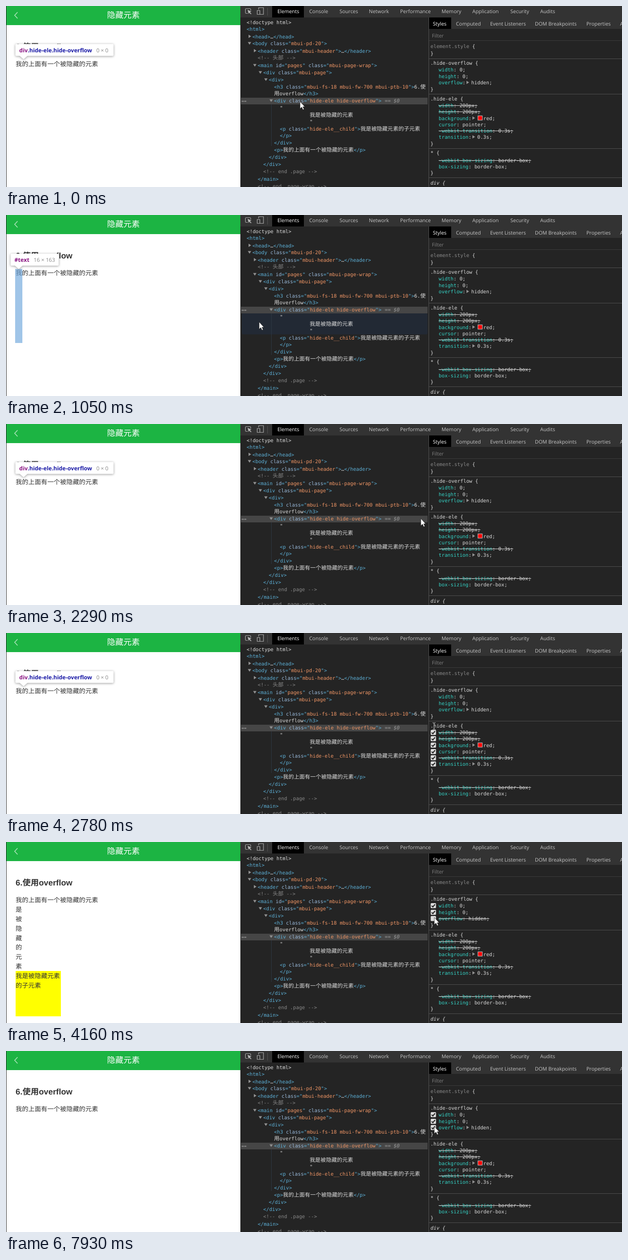
Recreate the animation shown at these times as an HTML page with a canvas. Size 1280 by 379 pixels, loop 8000 ms.

```html
<!DOCTYPE html>
<html lang="zh">
<head>
<meta charset="utf-8">
<style>
html, body { margin: 0; width: 100%; height: 100%; overflow: hidden; background: #242424; }
canvas { display: block; }
</style>
</head>
<body>
<canvas id="stage" width="1280" height="379"></canvas>
<script>
const ctx = document.getElementById('stage').getContext('2d');
ctx.textRendering = 'geometricPrecision';

const LOOP = 8000;
const CJK = '"Noto Sans CJK SC", "Noto Sans CJK JP", sans-serif';
const UI = `10.5px "Open Sans", ${CJK}`;
const MONO = '10.3px "DejaVu Sans Mono", monospace';
const TAG = '#5db0d7', ATTR = '#9bbbdc', VALUE = '#f29766', PLAIN = '#dcdcdc', DIM = '#898989', PROP = '#35d4c7';

// Pointer stops: start time, x, y, highlighted node, pointer shape
const STOPS = [
  [0, 611, 200, 'div'], [650, 565, 200, 'div'], [780, 525, 201, 'div'],
  [930, 525, 211, 'text'], [1050, 526, 224, 'text'], [1200, 545, 221, 'text'],
  [1330, 563, 217, 'text'], [1480, 604, 210, 'text'], [1600, 645, 203, 'div'],
  [1720, 673, 201, 'div'], [1870, 716, 200, 'div'], [2020, 775, 200, 'div'],
  [2140, 833, 200, 'div'], [2290, 862, 198, 'div'], [2410, 888, 194, '', 'beam'],
  [2530, 889, 195, '', 'beam'], [2780, 889, 195, 'div', 'beam'], [2930, 949, 180, ''],
  [3090, 933, 163, '', 'beam'], [3230, 920, 161, '', 'beam'], [3350, 908, 159, '', 'beam'],
  [3500, 897, 158, ''], [3650, 893, 158, ''], [3800, 891, 158, ''], [3920, 890, 158, '']
];

// Indent, middle line, markup, fold arrow
const MARKUP = [
  [512, 63.5, '<head>…</head>', 'right'],
  [512, 78, '<body class="mbui-pd-20">', 'down'],
  [523, 93.5, '<header class="mbui-header">…</header>', 'right'],
  [523, 108, '<!-- 头部 -->'],
  [523, 124, '<main id="pages" class="mbui-page-wrap">', 'down'],
  [534.5, 139, '<div class="mbui-page">', 'down'],
  [546, 154, '<div>', 'down'],
  [557, 169, '<h3 class="mbui-fs-18 mbui-fw-700 mbui-ptb-10">6.使'],
  [557, 183, '用overflow</h3>'],
  [557, 198, '<div class="hide-ele hide-overflow">', 'down'],
  [569, 257, '<p class="hide-ele__child">我是被隐藏元素的子元素'],
  [569, 271, '</p>'],
  [557, 286, '</div>'],
  [557, 301, '<p>我的上面有一个被隐藏的元素</p>'],
  [546, 316, '</div>'],
  [534.5, 331, '</div>'],
  [534.5, 346, '<!-- end .page -->'],
  [523, 362, '</main>'],
  [523, 377, '<!-- end .page-wrap -->']
];
const TOKEN = /(<!--.*-->)|(<[^!>][^ >]*>?|>|="|")|(\w+(?=="))|((?<==")[^"]+)|( +|[^<">\s][^<">]*)/g;
const TOKEN_COLORS = [DIM, TAG, ATTR, VALUE, PLAIN];

function rect(x, y, w, h, color) {
  ctx.fillStyle = color;
  ctx.fillRect(x, y, w, h);
}

function shape(path, x, y, fill, stroke, width = 1) {
  ctx.save();
  ctx.translate(x, y);
  const p = new Path2D(path);
  if (fill) { ctx.fillStyle = fill; ctx.fill(p); }
  if (stroke) { ctx.strokeStyle = stroke; ctx.lineWidth = width; ctx.stroke(p); }
  ctx.restore();
}

function text(s, x, y, color, font) {
  ctx.font = font;
  ctx.fillStyle = color;
  ctx.fillText(s, x, y);
  return x + ctx.measureText(s).width;
}

// Code text centred on y; Chinese runs are set a little larger
function code(s, x, y, color = PLAIN, style = '') {
  for (const run of s.match(/[\u4e00-\u9fff]+|[^\u4e00-\u9fff]+/g)) {
    x = text(run, x, y + 4, color, style + (run >= '\u4e00' ? '11.3px ' + CJK : MONO));
  }
  return x;
}

function fold(x, y, dir) {
  shape(dir === 'down' ? 'M-3.5-2.5H3.5L0 3Z' : 'M-2-3.5V3.5L3.5 0Z', x, y, '#919191');
}

function page(off) {
  rect(0, 0, 487, 379, '#fff');
  rect(0, 0, 487, 40, '#1cb443');
  rect(0, 0, 1, 379, '#2a2a2a');
  shape('M6 0L0 6.5L6 13', 18, 13, null, '#a9e3b8', 1.6);
  text('隐藏元素', 210, 25, '#fff', '17px ' + CJK);
  text('6.使用overflow', 20, 91, '#333', `bold 17px "Liberation Sans", ${CJK}`);
  const body = (s, y) => text(s, 20, y + 5, '#333', '13.2px ' + CJK);
  body('我的上面有一个被隐藏的元素', 121);
  if (!off) return;
  [...'是被隐藏的元素'].forEach((c, i) => body(c, 141 + i * 19.85));
  rect(20, 270, 94, 95, '#ff0');
  body('我是被隐藏元素', 280);
  body('的子元素', 300);
}

function bubble(x, y, w, tipX, parts, size) {
  ctx.save();
  ctx.shadowColor = 'rgba(0,0,0,.4)';
  ctx.shadowBlur = 5;
  ctx.shadowOffsetY = 1;
  shape(`M2 0H${w - 2}Q${w} 0 ${w} 2V23Q${w} 25 ${w - 2} 25H${tipX + 8}L${tipX} 32L${tipX - 8} 25H2Q0 25 0 23V2Q0 0 2 0Z`, x, y, '#fff');
  ctx.restore();
  let end = x + 8;
  for (const [s, color] of parts) end = text(s, end, y + 17, color, `bold 11.7px "Open Sans", sans-serif`);
  text(size, end + 9, y + 17, '#888', '11.2px "Open Sans", sans-serif');
}

function highlight(node) {
  if (node === 'div') {
    bubble(19.5, 79.5, 204, 17, [['div', '#881280'], ['.hide-ele.hide-overflow', '#1a1aa6']], '0 × 0');
  } else if (node === 'text') {
    rect(19, 113, 15, 155, 'rgba(111,168,220,.66)');
    bubble(9.5, 81, 100, 17, [['#text', '#881280']], '16 × 163');
  }
}

function toolbars() {
  rect(487, 0, 793, 379, '#242424');
  rect(487, 0, 793, 24, '#333');
  rect(553, 0, 66, 24, '#000');
  rect(543, 4, 1, 16, '#525252');
  shape('M5 10H1.5Q0 10 0 8.5V1.5Q0 0 1.5 0H9.5Q11 0 11 1.5V4', 497.5, 5.5, null, '#aaa', 1.2);
  shape('M0 0L8 3.5L4.8 4.8L8 8.3L6.8 9.3L3.6 6L2.3 8.5Z', 502, 8, '#bbb');
  shape('M3 4V0H13V14H6M0 6H5.5V14H0Z', 522, 3.5, null, '#aaa', 1.2);
  const tabs = (names, y, active) => {
    for (const [s, x] of names) text(s, x, y, s === active ? '#fff' : '#c6c6c6', UI);
  };
  tabs([['Elements', 564], ['Console', 630], ['Sources', 693], ['Network', 754], ['Performance', 819],
    ['Memory', 905], ['Application', 969], ['Security', 1048], ['Audits', 1110]], 15, 'Elements');

  rect(879, 24, 401, 24, '#333');
  rect(879, 24, 46, 24, '#000');
  tabs([['Styles', 887], ['Computed', 935], ['Event Listeners', 1006], ['DOM Breakpoints', 1099],
    ['Properties', 1206], ['A', 1276]], 40.5, 'Styles');
  text('Filter', 885, 66, '#808080', UI);
  rect(879, 72, 401, 1, '#3c3c3c');
  rect(878, 24, 1, 355, '#525252');
}

function elements(hoverText) {
  rect(488, 192, 388, 14, '#464646');
  if (hoverText) {
    ctx.beginPath();
    ctx.roundRect(490, 206, 386, 44, 3);
    ctx.fillStyle = '#222934';
    ctx.fill();
  }
  rect(551, 206, 1, 87, '#2d3742');
  for (let i = 0; i < 3; i++) rect(490 + i * 3.5, 198.5, 2, 2, '#aaa');
  code('<!doctype html>', 500, 33.5);
  code('<html>', 500, 48, TAG);
  for (const [x, y, line, arrow] of MARKUP) {
    let end = x;
    for (const m of line.matchAll(TOKEN)) {
      end = code(m[0], end, y, TOKEN_COLORS[m.slice(1).findIndex(Boolean)]);
    }
    if (arrow) fold(x - 6, y, arrow);
  }
  code('== $0', 787, 198, '#9a9a9a', 'italic ');
  code('"', 569, 213);
  code('我是被隐藏的元素', 631, 227.5);
  code('"', 631, 242);
}

function checkbox(y, on) {
  ctx.beginPath();
  ctx.roundRect(882.5, y - 5, 11, 10.5, 1.5);
  ctx.fillStyle = '#dedede';
  ctx.fill();
  if (on) shape('M0 3L2.5 5.5L7 0', 884.5, y - 2.5, null, '#222', 2);
}

// One declaration; extras: struck, folded, swatch
function declare(y, name, value, { struck, folded, swatch } = {}) {
  let x = code(name, 899, y, PROP);
  x = code(':', x, y);
  if (folded) {
    fold(x + 4, y, 'right');
    x += 12;
  } else {
    x = code(' ', x, y);
  }
  if (swatch) {
    rect(x + 1, y - 5, 10, 10, '#ccc');
    rect(x + 2, y - 4, 8, 8, swatch);
    x += 12.5;
  }
  x = code(value + ';', x, y);
  if (struck) rect(899, Math.round(y), x - 899, 1, '#d4d4d4');
}

function styles(t, off) {
  for (const y of [110, 184, 298, 359]) rect(879, y, 401, 1, '#4f4f4f');
  for (const y of [99, 173.5, 288, 349]) code('}', 882, y);
  code('{', code('element.style ', 882, 84, DIM), 84);
  code('.hide-overflow {', 882, 118.5);
  declare(133, 'width', '0');
  declare(147, 'height', '0');
  declare(160, 'overflow', 'hidden', { struck: off, folded: !off });
  code('.hide-ele {', 882, 193.5);
  declare(208, 'width', '200px', { struck: true });
  declare(221, 'height', '200px', { struck: true });
  declare(234.5, 'background', 'red', { folded: true, swatch: '#f00' });
  declare(248, 'cursor', 'pointer');
  declare(261, '-webkit-transition', '0.3s', { struck: true });
  declare(274, 'transition', '0.3s', { folded: true });
  code('* {', 882, 307);
  declare(322.5, '-webkit-box-sizing', 'border-box', { struck: true });
  declare(336, 'box-sizing', 'border-box');
  code('div {', 882, 369.5, PLAIN, 'italic ');

  if (t >= 2930) {
    checkbox(133, true);
    checkbox(147, true);
    checkbox(160, !off);
  } else if (t >= 2410) {
    for (const y of [208, 221, 234.5, 248, 261, 274]) checkbox(y, true);
  }
}

function pointer(x, y, kind) {
  if (kind === 'beam') {
    shape('M-3-7H-1L0-6L1-7H3M0-6V6M-3 7H-1L0 6L1 7H3', x + .5, y, null, '#ddd');
  } else {
    shape('M0 0V15L3.5 11.8L6 17.3L8.3 16.3L5.9 11H10Z', x, y, '#fff', '#222', .7);
  }
}

function draw() {
  const t = performance.now() % LOOP;
  const [, x, y, node, kind] = STOPS.findLast(stop => stop[0] <= t);
  const off = t >= 4160 && t < 7930;
  page(off);
  highlight(node);
  toolbars();
  elements(node === 'text');
  styles(t, off);
  pointer(x, y, kind);
  requestAnimationFrame(draw);
}
draw();
</script>
</body>
</html>
```
